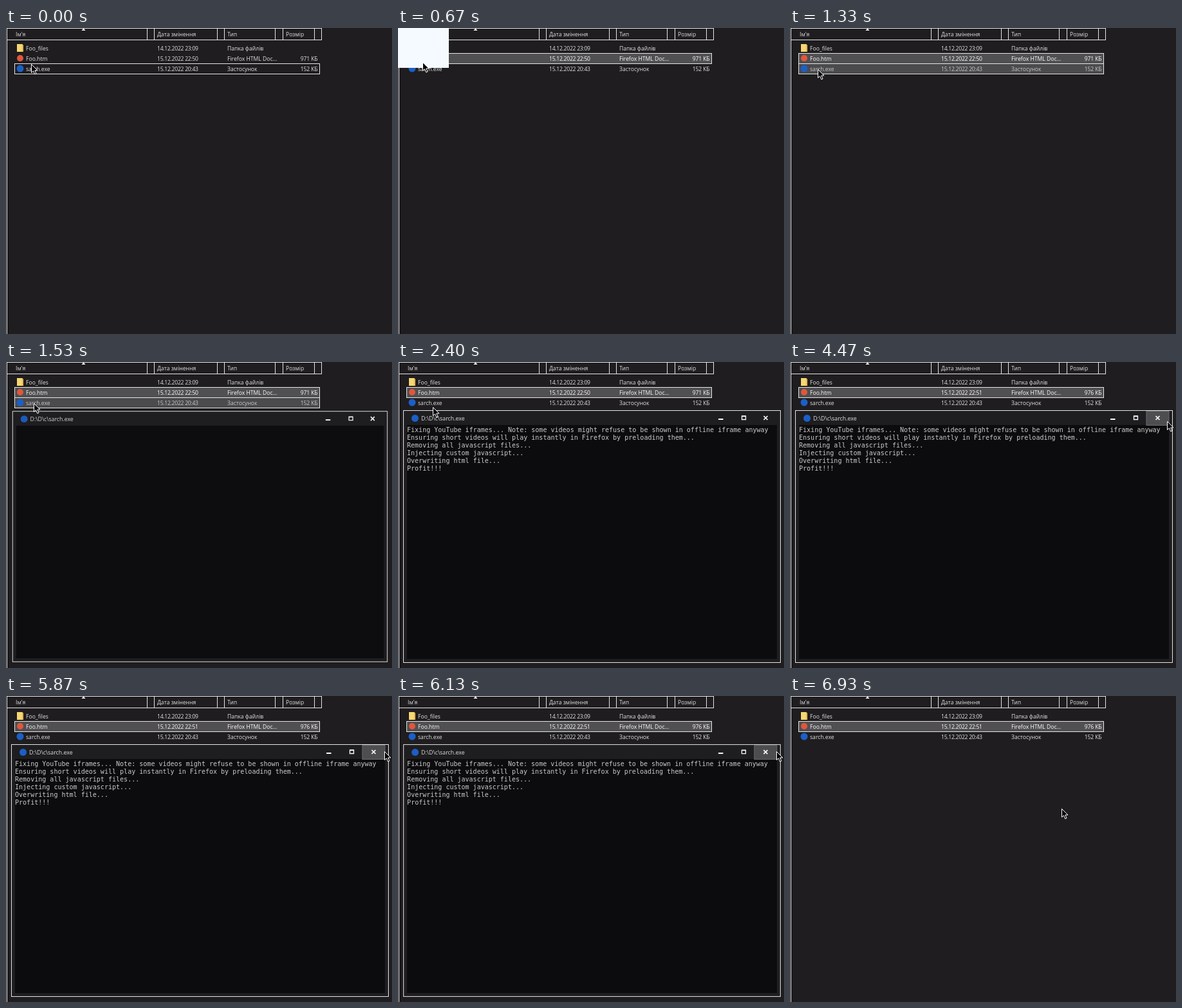
Recreate the animation shown at these times as an HTML page. Size 600 by 476 pixels, loop 7.19 s.

```html
<!DOCTYPE html>
<html lang="uk">
<head>
<meta charset="utf-8">
<style>
  html, body { margin: 0; width: 100%; height: 100%; overflow: hidden; background: #1f1d1f; }
  svg { display: block; }
  text { font: 8.6px "Open Sans", "Noto Sans", sans-serif; fill: #e2e2e2; white-space: pre; }
  .date { letter-spacing: -.27px; }
  .size { letter-spacing: -.12px; text-anchor: end; }
  .title { font-size: 8.8px; }
  .console text { font: 10.04px "DejaVu Sans Mono", "Liberation Mono", monospace; fill: #ccc; }
  .line { fill: none; stroke: #e6e6e6; }
  .pointer { fill: #000; stroke: #fff; stroke-linejoin: round; }
</style>
</head>
<body>
<svg width="600" height="476" viewBox="0 0 600 476">
  <rect width="600" height="476" fill="#1f1d1f"/>
  <path class="line" d="M1.5 0V476M2 .5H490M2 18.5H490M219.5 0V18M230.5 0V18M328.5 0V18M339.5 0V18M418.5 0V18M430.5 0V18M479.5 0V18M490.5 0V19"/>
  <path d="M117.5 4L120.5 0.5L123.5 4Z" fill="#fff"/>
  <text x="15" y="13">Ім'я</text>
  <text x="235" y="13">Дата змінення</text>
  <text x="344" y="13">Тип</text>
  <text x="435" y="13">Розмір</text>

  <rect id="htmRow" class="line" x="13.5" y="39.5" width="474" height="16"/>
  <rect id="exeRow" class="line" x="13.5" y="55.5" width="474" height="16"/>
  <path d="M17 25H25L27 27V37H17Z" fill="#f7d774"/>
  <path d="M25 25L27 27V37H25Z" fill="#e3b64c"/>
  <circle cx="22" cy="47" r="5" fill="#e0573c"/>
  <circle cx="22" cy="63" r="5.5" fill="#1c5fc6"/>
  <g id="rows"></g>

  <g id="win">
    <rect class="line" x="8.5" y="75.5" width="586" height="392" style="fill:#1e1d1f"/>
    <rect x="14" y="98" width="575" height="364" fill="#0c0b0d"/>
    <circle cx="26.5" cy="87.5" r="5.5" fill="#1c5fc6"/>
    <text class="title" x="36" y="90.5">D:\D\c\sarch.exe</text>
    <rect id="hover" y="76.5" width="35" height="22" fill="#4e4d4f" stroke="#6b6a6c"/>
    <path d="M498 89H505.5" stroke="#fff" stroke-width="2"/>
    <path d="M534.5 84.5H540.5V89.5H534.5ZM534 84H541" fill="none" stroke="#fff" stroke-width="1.3"/>
    <path d="M568.5 84L574.5 90M574.5 84L568.5 90" stroke="#fff" stroke-width="1.7"/>
    <g id="output" class="console"></g>
  </g>

  <rect id="ghost" width="82" height="82" fill="#f4faff"/>
  <path id="arrow" class="pointer" d="M.5 .5V13.5L3.5 10.8L5.8 16L8 15L5.8 10H10Z"/>
  <path id="resize" class="pointer" d="M0 -8L4 -4H1.2V4H4L0 8L-4 4H-1.2V-4H-4Z"/>
</svg>
<script>
const LOOP = 7190, STEP = 1000 / 15;
const $ = id => document.getElementById(id);

function addText(parent, x, y, str, cls = '') {
  const el = document.createElementNS('http://www.w3.org/2000/svg', 'text');
  el.setAttribute('x', x);
  el.setAttribute('y', y);
  el.setAttribute('class', cls);
  el.textContent = str;
  return parent.appendChild(el);
}

const files = [
  ['Foo_files', '14.12.2022 23:09', 'Папка файлів', ''],
  ['Foo.htm', '15.12.2022 22:50', 'Firefox HTML Doc...', '971 КБ'],
  ['sarch.exe', '15.12.2022 20:43', 'Застосунок', '152 КБ']
];
const cells = files.map(([name, date, type, size], i) => {
  const y = 34.5 + i * 16;
  return [
    addText($('rows'), 31, y, name),
    addText($('rows'), 235, y, date, 'date'),
    addText($('rows'), 344, y, type),
    addText($('rows'), 484.5, y, size, 'size')
  ];
});

[
  'Fixing YouTube iframes... Note: some videos might refuse to be shown in offline iframe anyway',
  'Ensuring short videos will play instantly in Firefox by preloading them...',
  'Removing all javascript files...',
  'Injecting custom javascript...',
  'Overwriting html file...',
  'Profit!!!'
].forEach((line, i) => addText($('output'), 14, 109 + i * 12, line));

// Pointer path: time, x, y
const path = [
  [0, 39, 56], [200, 38, 47], [467, 38, 47], [667, 38, 53], [733, 40, 60],
  [867, 43, 71], [1000, 43, 64], [2133, 43, 64], [2400, 54, 70],
  [2533, 74, 103], [2733, 100, 91], [2933, 100, 91], [3267, 240, 84],
  [3600, 403, 77], [3667, 403, 77], [3800, 424, 81], [4000, 474, 90],
  [4400, 585, 87], [4467, 586, 92], [5533, 586, 92], [5667, 588, 97],
  [5867, 588, 86], [6267, 588, 86], [6533, 490, 135], [6800, 418, 170],
  [6933, 422, 175], [LOOP, 422, 175]
];

function pointerAt(t) {
  const i = Math.max(1, path.findIndex(p => p[0] >= t));
  const [t0, x0, y0] = path[i - 1], [t1, x1, y1] = path[i];
  const k = (t - t0) / (t1 - t0);
  return [Math.round(x0 + (x1 - x0) * k), Math.round(y0 + (y1 - y0) * k)];
}

const clamp = v => Math.min(1, Math.max(0, v));
const within = (v, a, b) => v >= a && v < b;
const show = (el, on) => el.setAttribute('display', on ? 'inline' : 'none');
const move = (el, x, y) => el.setAttribute('transform', `translate(${x} ${y})`);
const setText = (el, str) => { if (el.textContent !== str) el.textContent = str; };

function draw(now) {
  const t = Math.floor((now % LOOP + 4) / STEP) * STEP + .5;
  const [x, y] = pointerAt(t);

  // File rows
  const picked = t > 330, over = within(t, 790, 2260), saved = t > 2590;
  const hoverHtm = within(t, 130, 330);
  show($('htmRow'), picked || hoverHtm);
  $('htmRow').style.fill = picked ? '#504f51' : '#39383a';
  show($('exeRow'), t < 330 || over);
  $('exeRow').style.fill = over ? '#4b4a4c' : 'none';
  cells[2].forEach(c => c.style.fill = over ? '#c8c8c8' : '');
  cells[1].forEach(c => c.style.fill = picked ? '#fff' : '');
  setText(cells[1][1], saved ? '15.12.2022 22:51' : '15.12.2022 22:50');
  setText(cells[1][3], saved ? '976 КБ' : '971 КБ');

  // Console window
  const opening = clamp((t - 1333) / 267), closing = clamp((t - 6133) / 200);
  const shown = (1 - (1 - opening) ** 2) * (1 - closing);
  const scale = .9 + .1 * shown;
  show($('win'), shown > .01);
  $('win').setAttribute('opacity', shown);
  $('win').setAttribute('transform', `translate(301.5 271.5) scale(${scale}) translate(-301.5 -271.5)`);
  show($('output'), t > 1999);
  const button = Math.floor((x - 483) / 35.4);
  show($('hover'), t > 3900 && within(y, 77, 99) && within(button, 0, 3));
  $('hover').setAttribute('x', [483.5, 518.5, 554][button] ?? 0);

  // Drag preview and pointer
  show($('ghost'), within(t, 467, 1333));
  move($('ghost'), x - 41, y - 73);
  const sizing = within(t, 3600, 3930);
  show($('arrow'), !sizing);
  show($('resize'), sizing);
  move(sizing ? $('resize') : $('arrow'), x, y);
}

const start = performance.now();
function tick() {
  draw(performance.now() - start);
  requestAnimationFrame(tick);
}
tick();
</script>
</body>
</html>
```
